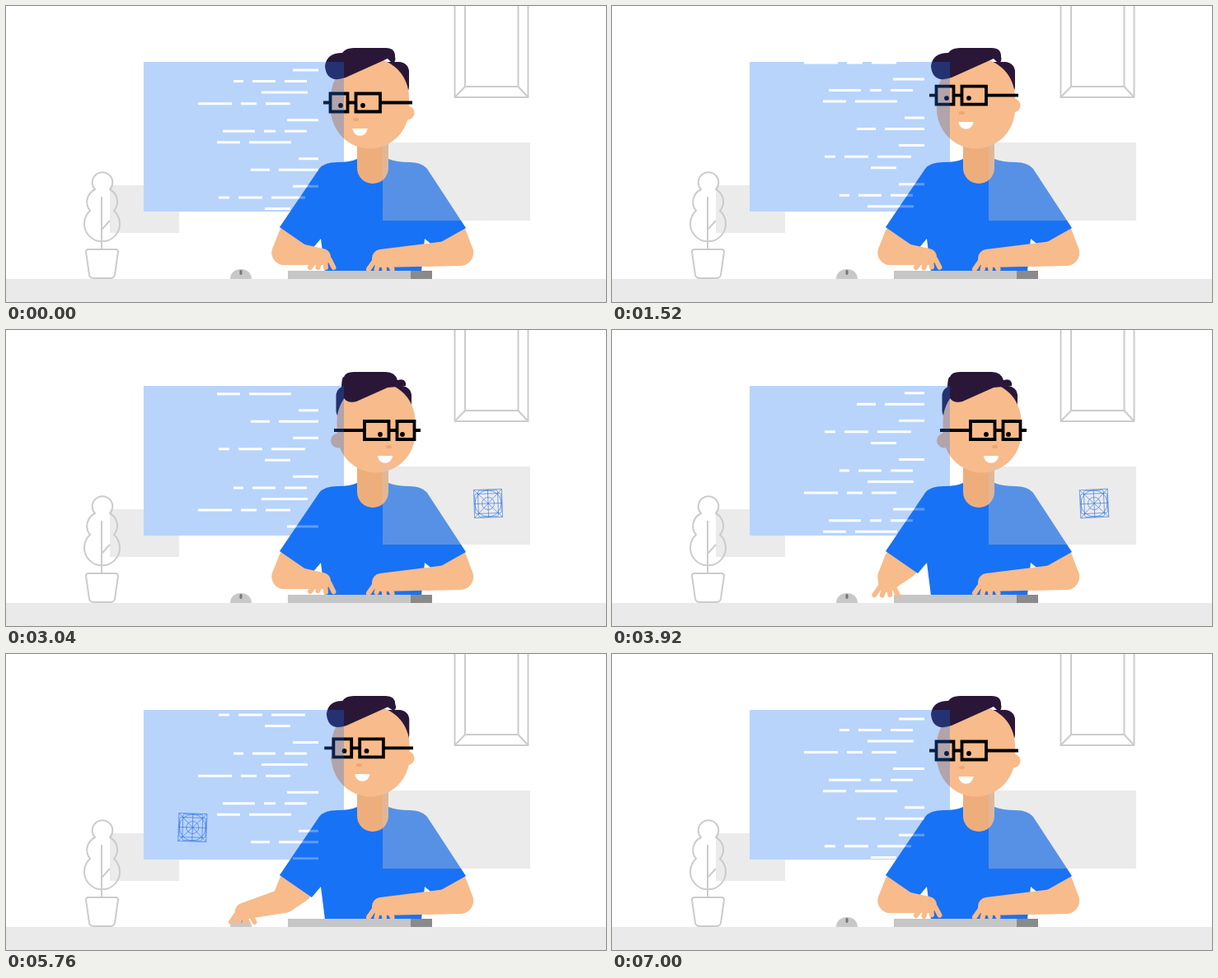
An HTML page for the animation above (7.04 s loop, 728 by 360 pixels).

```html
<!DOCTYPE html>
<html lang="en">
<head>
<meta charset="utf-8">
<title>Designer at a desk</title>
<style>
  html, body { margin: 0; width: 100%; height: 100%; overflow: hidden; background: #fff; }
  svg { display: block; width: 728px; height: 360px; }
  .outline { fill: none; stroke: #ccc; stroke-width: 2; stroke-linejoin: round; }
  .skin { fill: #f8bb8b; }
  .fingers { fill: none; stroke: #f8bb8b; stroke-width: 6; stroke-linecap: round; }
  .hair { fill: #2a1738; }
  .blue { fill: #1872f5; }
  .panel { fill: #c8c8c8; opacity: .36; }
  #glasses { fill: none; stroke: #000; stroke-width: 3.8; }
  #icon { fill: none; stroke: #2a6fe0; stroke-width: .6; }
</style>
</head>
<body>
<svg viewBox="0 0 728 360">
  <defs><clipPath id="screen"><rect x="167" y="68" width="243" height="182"/></clipPath></defs>

  <!-- room -->
  <g class="outline">
    <path d="M544.5 -4V111H633.5V-4M557 -4V98H621.5V-4M544.5 111L557 98M633.5 111L621.5 98"/>
    <path d="M108 223A12.3 12.3 0 1 1 126 223A17 17 0 0 1 131 249A21.5 21.5 0 1 1 102 249A17 17 0 0 1 108 223Z"/>
    <path d="M116 232V296M116 272L126 261M100 296H133Q136 296 136 299L132 327Q131 331 127 331H106Q102 331 101 327L97 299Q97 296 100 296Z"/>
  </g>
  <rect class="panel" x="126" y="218" width="84" height="58"/>
  <rect x="167" y="68" width="243" height="182" fill="#fff"/>
  <rect y="332" width="728" height="28" fill="#eaeaea"/>
  <g id="mouse">
    <path d="M-13 332C-13 316 13 316 13 332Z" fill="#c8c8c8"/>
    <rect x="-1.5" y="321" width="3" height="6" rx="1.5" fill="#777"/>
  </g>

  <!-- person -->
  <path class="blue" d="M380 198Q386 190 402 190Q418 190 426 186H464Q474 190 490 190Q504 190 511 198L508 283L504 323H387L382 283Z"/>
  <path d="M426 160V197a19 19 0 0 0 38 0V160Z" fill="#eeae7c"/>
  <rect id="back" class="hair" y="68" height="42" rx="12"/>
  <g id="ears" class="skin"><circle cx="403" r="9"/><circle cx="487" r="8.5"/></g>
  <path id="face" class="skin" d="M-47.5 111A47.5 48 0 0 1 47.5 111V125A47.5 48.5 0 0 1 -47.5 125Z"/>
  <path id="fringe" class="hair"/>
  <ellipse id="nose" rx="3.5" ry="2" fill="#eda673"/>
  <path id="mouth" d="M-9 0H9A9 8.7 0 0 1 -9 0Z" fill="#fff"/>
  <g id="eyes"><circle r="2.9"/><circle cx="27" r="2.9"/></g>
  <path id="glasses"/>
  <path d="M342 322H491V332H342Z" fill="#c6c6c6"/>
  <path d="M491 322H517V332H491Z" fill="#8a8a8a"/>
  <path id="upperArms" class="skin"/>
  <path class="blue" d="M332 269L380 198H388L382 283L371 296ZM558 270L511 198H503L508 283L519 292Z"/>
  <path id="forearms" class="skin"/>
  <path id="fingers" class="fingers"/>

  <!-- floating panels -->
  <rect class="panel" x="457" y="166" width="179" height="95"/>
  <g clip-path="url(#screen)" opacity=".3">
    <rect class="blue" x="167" y="68" width="243" height="182"/>
    <path id="code" stroke="#fff" stroke-width="3"/>
  </g>
  <g id="icon">
    <rect x="-17" y="-17" width="34" height="34"/>
    <rect x="-16" y="-12" width="32" height="24" rx="2"/>
    <rect x="-12" y="-16" width="24" height="32" rx="2"/>
    <circle r="16"/><circle r="7.5"/>
    <path d="M-17 -17L17 17M17 -17L-17 17M0 -17V17M-17 0H17"/>
  </g>
</svg>
<script>
const LOOP = 7040, LINE = 13.56, BLOCK = 20, GAP = 11, start = performance.now();
const $ = id => document.getElementById(id);
const set = (id, name, value) => $(id).setAttribute(name, value);
const place = (id, x, y, extra = '') => set(id, 'transform', `translate(${x} ${y})${extra}`);
const mix = (a, b, k) => a + (b - a) * k;

// Eased 0 to 1 between two times, and a rise followed by a fall.
function ramp(t, from, to) {
  const k = Math.min(1, Math.max(0, (t - from) / (to - from)));
  return (1 - Math.cos(Math.PI * k)) / 2;
}
const pulse = (t, up, top, down, end) => ramp(t, up, top) - ramp(t, down, end);

// Blocks of code; each line is its right edge, then dash lengths leftwards.
const blocks = [
  [[379, 31], [365, 27, 28, 12], [366, 56], [345, 30, 19, 41]],
  [[379, 38], [365, 27, 14, 39], [346, 51, 28]],
  [[379, 24], [379, 48, 23]],
  [[379, 31], [363, 41, 29, 13], [345, 31]]
];

// Writes one page of code into the path and returns the y below it.
function layPage(y, path) {
  for (const block of blocks) {
    block.forEach(([x, ...dashes], i) => {
      for (const w of dashes) {
        path.push(`M${x} ${y + i * LINE}h${-w}`);
        x -= w + GAP;
      }
    });
    y += (block.length - 1) * LINE + BLOCK;
  }
  return y;
}
const dashes = [], TOP = 78;
const PAGE = layPage(TOP, dashes) - TOP;
layPage(TOP + PAGE, dashes);
layPage(TOP + 2 * PAGE, dashes);
set('code', 'd', dashes.join(''));

// Scrolling changes pace at these moments.
const pace = [[0, 0], [720, 28.5], [2320, 71], [5160, 138.5], [5760, 159], [LOOP, PAGE]];
function scrolled(t) {
  const i = pace.findIndex(([time]) => time > t);
  const [t0, a] = pace[i - 1], [t1, b] = pace[i];
  return mix(a, b, (t - t0) / (t1 - t0));
}

function drawHead(t) {
  const u = pulse(t, 2200, 2870, 4887, 5977);
  const y = 117.5 - 9 * ramp(t, 0, 1600) + 13.5 * ramp(t, 2200, 2870)
    - 8.5 * ramp(t, 4887, 5977) + 4 * ramp(t, 5977, 7000);
  const turn = (a, b) => mix(a, b, u);
  const low = (y - 117.5) * .9;

  const back = turn(401, 400.5);
  set('back', 'x', back);
  set('back', 'width', turn(489, 492) - back);
  place('ears', 0, y + 12.5);
  place('face', turn(441.5, 449), 0);
  place('nose', turn(424.5, 464.5), 138 + low);
  place('mouth', turn(429.5, 460), 149 + low);
  place('eyes', turn(406, 454), y + turn(3.5, 5));

  const l = turn(387, 407), crown = l + turn(21, 3);
  set('fringe', 'd', `M${crown} 57Q412 51 422 51H461Q472 51 ${turn(472, 475)} 61` +
    `Q${turn(474, 486)} ${turn(70, 58)} ${turn(467, 485)} 68L463 ${turn(64, 70)}` +
    `L${l + turn(25, 18)} 87Q${l + 2} ${turn(95, 91)} ${l} 73Q${l + turn(2, 0)} 57 ${crown} 57Z`);

  // The far lens is narrower than the near one.
  const bridge = turn(419.5, 469.5), w1 = turn(21, 29.5), w2 = turn(29.5, 21);
  const a = bridge - 5, b = bridge + 5;
  const lens = (x, w) => `M${x} ${y - 11}h${w}v22h${-w}Z`;
  set('glasses', 'd', lens(a - w1, w1) + lens(b, w2) +
    `M${turn(385, 398)} ${y}H${a - w1}M${a} ${y}H${b}M${b + w2} ${y}H${turn(493, 503)}`);
}

// Outline around two circles: a tapered, round-ended limb.
function limb([x0, y0, r0], [x1, y1, r1]) {
  const angle = Math.atan2(y1 - y0, x1 - x0);
  const spread = Math.acos((r0 - r1) / Math.hypot(x1 - x0, y1 - y0));
  const on = (x, y, r, side) =>
    `${x + r * Math.cos(angle + side * spread)} ${y + r * Math.sin(angle + side * spread)}`;
  return `M${on(x0, y0, r0, 1)}A${r0} ${r0} 0 1 1 ${on(x0, y0, r0, -1)}` +
    `L${on(x1, y1, r1, -1)}A${r1} ${r1} 0 0 1 ${on(x1, y1, r1, 1)}Z`;
}

function hand([x, y], wiggle) {
  let d = '';
  for (let i = 0; i < 4; i++)
    d += `M${x - 8 + 5.5 * i} ${y + 3}L${x - 15 + 9.5 * i} ${y + 13 + wiggle * Math.sin(i * 2)}`;
  return d;
}

function drawArms(t) {
  const reach = pulse(t, 3600, 4220, 5960, 6480);
  const drag = pulse(t, 4450, 4900, 5160, 5700);
  const elbows = [[337.5, 300, 15], [551, 300, 16]];
  const hands = [[384 - 96 * reach + 10 * drag, 305 + 8 * reach, 10], [455, 307, 11]];
  const wiggle = (1 - reach) * Math.sin(t / 55);

  set('upperArms', 'd', limb([352, 282, 22], elbows[0]) + limb([538, 281, 21.5], elbows[1]));
  set('forearms', 'd', elbows.map((elbow, i) => limb(elbow, hands[i])).join(''));
  set('fingers', 'd', hands.map(h => hand(h, wiggle)).join(''));
  place('mouse', 285 + 10 * drag, 0);
}

function drawIcon(t) {
  const x = 521 + 64 * ramp(t, 2270, 2800) - 385 * ramp(t, 5060, 5903);
  const size = t < 2270 ? 0 : .2 + .8 * ramp(t, 2270, 2800) - ramp(t, 6150, 6550);
  place('icon', x, 211, `rotate(${-4 * Math.sin(t / 200)})scale(${size})`);
}

function draw() {
  const t = (performance.now() - start) % LOOP;
  place('code', 0, -scrolled(t));
  drawHead(t);
  drawArms(t);
  drawIcon(t);
  requestAnimationFrame(draw);
}
draw();
</script>
</body>
</html>
```
